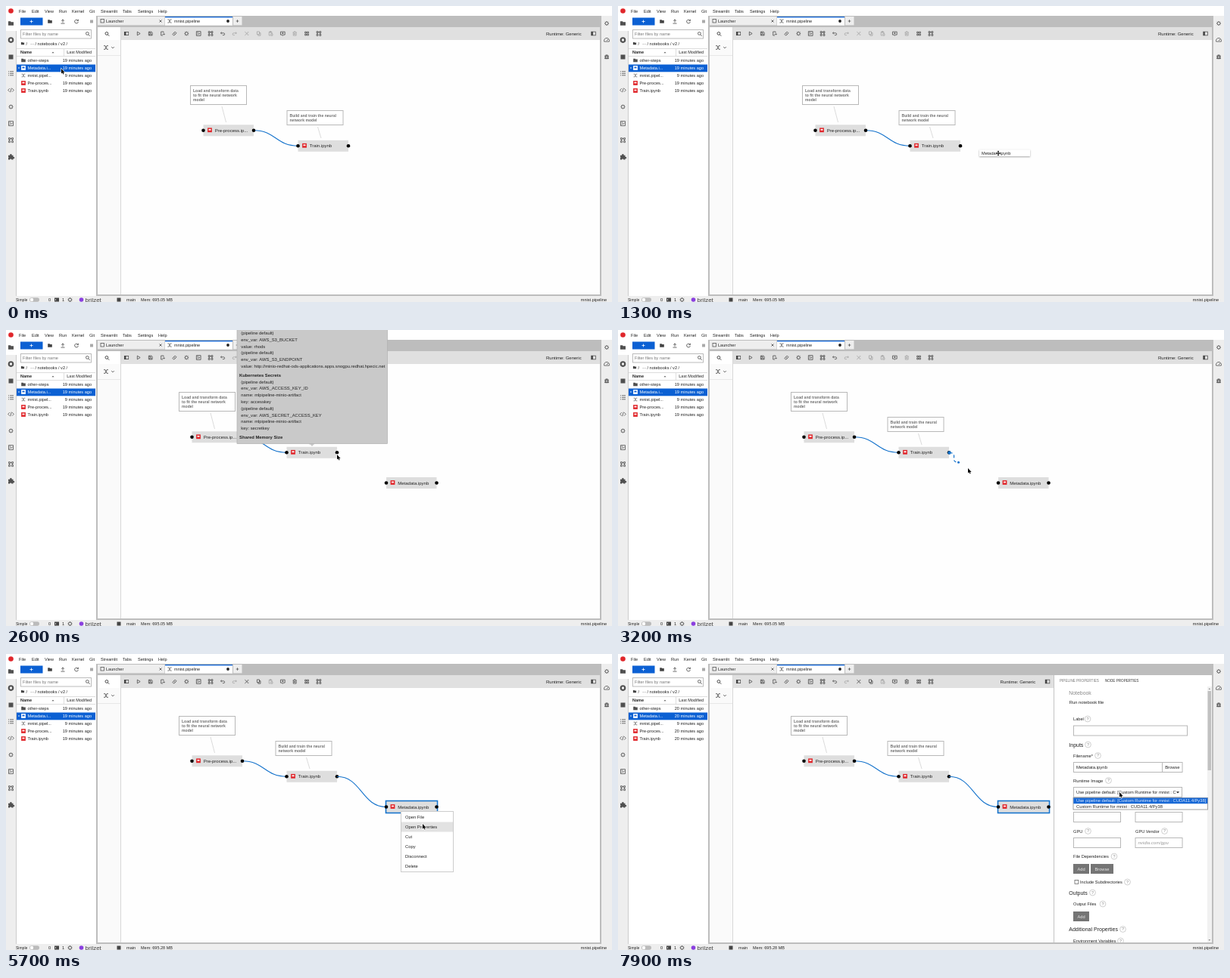
Animation, 800 px wide and 392 px high, one loop 8000 ms. Source, as an HTML page with a canvas:

```html
<!DOCTYPE html>
<html lang="en">
<head>
<meta charset="utf-8">
<title>Pipeline editor</title>
<style>
html, body { margin: 0; width: 100%; height: 100%; overflow: hidden; background: #fff; }
canvas { display: block; width: 800px; height: 392px; }
</style>
</head>
<body>
<canvas id="stage" width="800" height="392"></canvas>
<script>
const ctx = document.getElementById('stage').getContext('2d');
const LOOP = 8000, STEP = 100;
const SANS = '"Liberation Sans", Arial, sans-serif';
const BLUE = '#0b60d3', LINK = '#1573cc', INK = '#222', RED = '#e0262b', FRAME = '#bdbdbd';

// ---------- drawing helpers ----------
function box(x, y, w, h, fill, stroke, lineWidth = 1) {
  if (fill) { ctx.fillStyle = fill; ctx.fillRect(x, y, w, h); }
  if (stroke) { ctx.strokeStyle = stroke; ctx.lineWidth = lineWidth; ctx.strokeRect(x, y, w, h); }
}

// y is the vertical middle of the capitals
function text(str, x, y, size = 5.6, color = INK, style = '', align = 'left') {
  ctx.font = `${style} ${size}px ${SANS}`;
  ctx.fillStyle = color;
  ctx.textAlign = align;
  ctx.fillText(str, x, y + size * 0.36);
}

function dot(x, y, r, color) {
  ctx.fillStyle = color;
  ctx.beginPath();
  ctx.arc(x, y, r, 0, 7);
  ctx.fill();
}

function line(x1, y1, x2, y2, color, width = 1) {
  ctx.strokeStyle = color;
  ctx.lineWidth = width;
  ctx.beginPath();
  ctx.moveTo(x1, y1);
  ctx.lineTo(x2, y2);
  ctx.stroke();
}

function icon(name, x, y, color = '#444', scale = 1) {
  const path = new Path2D(ICONS[name]);
  ctx.save();
  ctx.translate(x, y);
  ctx.scale(scale, scale);
  ctx.fillStyle = ctx.strokeStyle = color;
  ctx.lineWidth = 0.8;
  if (SOLID.has(name)) ctx.fill(path, 'evenodd'); else ctx.stroke(path);
  ctx.restore();
}

const GRID = 'M-2.5-2.5H-.6V-.6H-2.5ZM.6-2.5H2.5V-.6H.6ZM-2.5 .6H-.6V2.5H-2.5ZM.6 .6H2.5V2.5H.6Z';
const GEAR = 'M-2 0A2 2 0 1 0 2 0A2 2 0 1 0-2 0M0-3V-2M0 2V3M-3 0H-2M2 0H3M-2.2-2.2L-1.4-1.4M1.4 1.4L2.2 2.2M-2.2 2.2L-1.4 1.4M1.4-1.4L2.2-2.2';
const ICONS = {
  folder: 'M-3.5-2.7H-.5L.3-1.8H3.5V2.8H-3.5Z',
  running: 'M-3.8 0A3.8 3.8 0 1 0 3.8 0A3.8 3.8 0 1 0-3.8 0M-1.5-1.5V1.5H1.5V-1.5Z',
  list: 'M-3.5-2.5H-2.5M-1.5-2.5H3.5M-3.5 0H-2.5M-1.5 0H3.5M-3.5 2.5H-2.5M-1.5 2.5H3.5',
  code: 'M-1.7-2.2L-3.8 0L-1.7 2.2M1.7-2.2L3.8 0L1.7 2.2M.7-2.8L-.7 2.8',
  gear: GEAR,
  image: 'M-3-3H3V3H-3ZM-2 1.8L-.5 0L.5 1L2-1M-2-1.5H0',
  nodes: 'M-3-3H-1V-1H-3ZM1-3H3V-1H1ZM-3 1H-1V3H-3ZM1 1H3V3H1ZM-1-2H1M-2-1V1M2-1V1',
  puzzle: 'M-3.5-2H-1.3A1.3 1.3 0 1 1 1.1-2H3V.2A1.2 1.2 0 1 1 3 2.3V3.7H.8A1.1 1.1 0 0 0-1.4 3.7H-3.5V1.5A1.1 1.1 0 0 0-3.5-.2Z',
  gauge: 'M-3.3 2A3.5 3.5 0 1 1 3.3 2ZM0 1L2-1.3',
  bug: 'M-1.6-1.5H1.6V2.5H-1.6ZM-3-1H3M-3 .8H3M-3 2.4H3M-1-3L0-1.6L1-3',
  search: 'M-2.5-.6A1.9 1.9 0 1 0 1.3-.6A1.9 1.9 0 1 0-2.5-.6M.8 .8L2.8 2.8',
  panel: 'M-3.2-2.7H3.2V2.7H-3.2ZM-.6-1.9V1.9H2.5V-1.9Z',
  play: 'M-1.6-2.5L2.4 0L-1.6 2.5Z',
  save: 'M-2.5-2.5H1.5L2.5-1.5V2.5H-2.5ZM-1.2 2.5V.5H1.2V2.5M-1.2-2.5V-1H1',
  export: 'M1.5-1V-2.6H-2V2.6H.5M0 .9H3L2 0M3 .9L2 1.8',
  eraser: 'M-2.7 .9L.8-2.6L2.7-.7L-.6 2.6H-1.2ZM-1-.8L1 1.1',
  undo: 'M-1.2-2L-2.6-.7L-1.2 .6M-2.6-.7H1.4Q2.8-.7 2.8 .8T1.4 2.2H0',
  redo: 'M1.2-2L2.6-.7L1.2 .6M2.6-.7H-1.4Q-2.8-.7-2.8 .8T-1.4 2.2H0',
  cut: 'M-2.5-2.5L1.6 1.2M-2.5 2.5L1.6-1.2M1.2 1.8H2.8M1.2-1.8H2.8',
  copy: 'M-2.3-2.7H1V1.2H-2.3ZM1-1H2.5V2.8H-.8V1.2',
  paste: 'M-2.3-2.2H1.6V0M-2.3-2.2V2.6H-.3M-1.2-2.9H.6V-1.6H-1.2ZM.4 .2H2.6V2.8H.4Z',
  comment: 'M-3-2.5H3V1.7H1L0 3L-1 1.7H-3ZM0-1.6V.9M-1.2-.4H1.2',
  trash: 'M-2.6-1.8H2.6M-1-2.8H1M-2-1.8V2.7H2V-1.8M-.6-.5V1.5M.6-.5V1.5',
  grid: GRID,
  flow: 'M-3-2.3H-1M1-2.3H3M-1-2.3L1 2.3M-1 2.3L1-2.3M-3 2.3H-1M1 2.3H3',
  plus: 'M-2 0H2M0-2V2',
  close: 'M-1.5-1.5L1.5 1.5M1.5-1.5L-1.5 1.5',
  down: 'M-1.8-.9L0 .9L1.8-.9',
  upload: 'M-2.5 2.6H2.5M0 1.3V-2.6M-1.7-.8L0-2.6L1.7-.8',
  refresh: 'M2.1-1.2A2.4 2.4 0 1 0 2.4 .6M2.4-2.8V-.9H.5',
  terminal: 'M-3-2.6H3V2.6H-3ZM-2-1.2L-.7 0L-2 1.2Z',
  caretUp: 'M-1.8 1L0-1L1.8 1Z',
  caretDown: 'M-2-1.1H2L0 1.2Z',
  arrow: 'M0 0V6.6L1.5 5.3L2.5 7.6L3.6 7.1L2.6 4.9H4.6Z',
  move: 'M0-3.5L1.3-2H.5V-.5H2V-1.3L3.5 0L2 1.3V.5H.5V2H1.3L0 3.5L-1.3 2H-.5V.5H-2V1.3L-3.5 0L-2-1.3V-.5H-.5V-2H-1.3Z'
};
const SOLID = new Set(['folder', 'running', 'puzzle', 'panel', 'terminal', 'caretUp', 'caretDown', 'arrow', 'move']);

// ---------- timing ----------
// [time, x, y] of the pointer
const POINTER = [
  [0, 73, 83], [100, 76, 84], [900, 533, 206], [1300, 502, 195], [1600, 502, 195], [1800, 500, 214],
  [2400, 437, 165], [2900, 437, 165], [3200, 462, 183], [3800, 504, 203], [4200, 504, 203],
  [4800, 521, 205], [5100, 521, 207], [5700, 550, 225], [6100, 550, 226], [6600, 575, 240],
  [6800, 575, 240], [7600, 662, 183], [8000, 662, 183]
];

function pointerAt(t) {
  const i = POINTER.findIndex(k => k[0] > t);
  const [t0, x0, y0] = POINTER[i - 1], [t1, x1, y1] = POINTER[i];
  const p = (t - t0) / (t1 - t0), e = p * p * (3 - 2 * p);
  return [x0 + (x1 - x0) * e, y0 + (y1 - y0) * e];
}

const within = (t, from, to) => t >= from && t < to;

// ---------- shell ----------
function drawMenuBar() {
  box(0, 0, 800, 13, '#fff');
  dot(6.5, 6.5, 3.3, RED);
  const items = { File: 17, Edit: 34, View: 51, Run: 70, Kernel: 87, Git: 110, Streamlit: 125, Tabs: 154, Settings: 174, Help: 201 };
  for (const name in items) text(name, items[name], 6.5);
}

function drawSidebars() {
  box(0, 13, 13, 371, '#eee');
  box(0, 13, 14, 20, '#fff');
  line(13.5, 33, 13.5, 384, '#ccc');
  ['folder', 'running', '', 'list', 'code', 'gear', 'image', 'nodes', 'puzzle']
    .forEach((name, i) => name && icon(name, 6.5, 23 + i * 22.1, '#505050'));
  box(3.5, 64.5, 6, 6, '#505050');
  box(786, 13, 14, 371, '#eee');
  ['gear', 'gauge', 'bug'].forEach((name, i) => icon(name, 793, 23 + i * 22.1, '#505050'));
}

function notebookIcon(x, y, color = RED, inner = '#fff') {
  box(x - 2.9, y - 2.9, 5.8, 5.8, color);
  box(x - 1.5, y - 1.4, 3, 1.8, inner);
}

function drawFiles(minutes) {
  box(14, 13, 105, 371, '#fff');
  box(19, 15.5, 29.5, 10, BLUE);
  icon('plus', 33.5, 20.5, '#fff');
  icon('folder', 58, 20.5, '#444', 0.8);
  icon('upload', 75, 20.5);
  icon('refresh', 93, 20.5);
  box(111, 18.5, 4, 4, '#aaa');
  box(19.5, 31.5, 93, 11.5, '#fff', '#bbb');
  text('Filter files by name', 22, 37.3, 5.6, '#777');
  icon('search', 108, 37);
  icon('folder', 22, 49.5, '#444', 0.6);
  text('/', 26.5, 49.5);
  text('···', 32, 49.5);
  text('/ notebooks / v2 /', 38.5, 49.5);

  line(14, 56.5, 118, 56.5, '#ddd');
  line(14, 66.5, 118, 66.5, '#ddd');
  line(76.5, 57, 76.5, 66, '#ddd');
  text('Name', 19, 61.5, 5.5, INK, 'bold');
  icon('caretUp', 62, 61.5, '#444', 0.8);
  text('Last Modified', 113, 61.5, 5.5, INK, '', 'right');

  const names = ['other-steps', 'Metadata.i...', 'mnist.pipel...', 'Pre-proces...', 'Train.ipynb'];
  names.forEach((name, i) => {
    const y = 72 + i * 10, selected = i === 1, ink = selected ? '#fff' : INK;
    if (selected) {
      box(14, 77.5, 104, 9.8, BLUE);
      dot(17, y, 0.8, '#fff');
    }
    if (i === 0) icon('folder', 23, y, '#505050', 0.8);
    else if (i === 2) icon('flow', 23, y, '#555', 0.8);
    else notebookIcon(23, y, selected ? '#fff' : RED, selected ? BLUE : '#fff');
    text(name, 28.5, y, 5.6, ink);
    text(`${i === 2 ? 9 : minutes} minutes ago`, 113, y, 5.6, ink, '', 'right');
  });
}

function drawStatus(memory) {
  box(0, 384, 800, 8, '#eee');
  text('Simple', 13, 389, 5);
  ctx.fillStyle = '#bbb';
  ctx.beginPath();
  ctx.roundRect(31, 386.3, 13, 5.4, 2.7);
  ctx.fill();
  dot(34, 389, 2.2, '#fff');
  text('0', 56, 389);
  icon('terminal', 67, 389);
  text('1', 74, 389);
  icon('gear', 84.5, 389);
  dot(99.5, 389, 2.8, '#8a3fe0');
  text('brilzet', 104.5, 388.8, 8, '#444');
  box(146.5, 386.5, 5, 5, '#444');
  text('main', 159, 389);
  text(`Mem: ${memory} MB`, 178, 389, 5.5);
  text('mnist.pipeline', 793, 389, 5.6, INK, '', 'right');
}

function drawTabs() {
  box(119, 13, 667, 13, FRAME);
  box(121, 14, 88.5, 11.5, '#eee');
  box(210, 14, 89, 12, '#fff');
  box(210, 14, 89, 1.3, BLUE);
  box(300, 14, 11.5, 11.5, '#eee');
  box(125, 17.5, 4.5, 4.5, null, '#555', 0.8);
  text('Launcher', 132, 20);
  icon('close', 204, 20);
  icon('flow', 216, 20, '#555', 0.9);
  text('mnist.pipeline', 222, 20);
  dot(293, 20, 1.9, INK);
  icon('plus', 305.5, 20, '#444', 0.9);
}

function drawToolbar(right, selected) {
  box(121, 28, right - 121, 17, '#e0e0e0');
  box(121, 28, 30, 17, '#fff');
  icon('search', 133.5, 37, '#222');
  box(121, 45, 30, 337, '#fafafa');
  icon('flow', 132, 55);
  icon('down', 141, 55);
  line(121, 65.5, 151, 65.5, '#e8e8e8');
  line(151.5, 28, 151.5, 382, '#d8d8d8');
  const names = ['panel', 'play', 'save', 'export', 'eraser', 'gear', 'image', 'nodes', 'undo', 'redo',
    'cut', 'copy', 'paste', 'comment', 'trash', 'grid', 'nodes'];
  const faint = new Set(selected ? ['redo', 'paste'] : ['redo', 'cut', 'copy', 'paste', 'trash']);
  names.forEach((name, i) => icon(name, 159 + i * 15.87, 36.5, faint.has(name) ? '#a0a0a0' : '#444', 0.95));
  text('Runtime: Generic', right - 24.3, 36.8, 6, INK, '', 'right');
  icon('panel', right - 8.5, 36.5);
}

function drawFrame() {
  box(119, 13, 2, 371, FRAME);
  box(121, 25.7, 663, 2.3, FRAME);
  box(784, 26, 2, 358, FRAME);
  box(119, 382, 667, 2, FRAME);
}

// ---------- pipeline canvas ----------
function node(x, y, label, selected) {
  box(x, y - 7.5, 66.5, 15, '#dedede');
  if (selected) box(x - 0.5, y - 8, 68, 16, null, LINK, 1.6);
  dot(x, y, 2.3, '#000');
  dot(x + 66.5, y, 2.3, '#000');
  notebookIcon(x + 8.5, y - 0.5);
  text(label, x + 15.2, y, 6);
}

function note(x, y, w, h, lines) {
  box(x + 0.5, y + 0.5, w, h, '#fff', '#b8b8b8');
  lines.forEach((str, i) => text(str, x + 4, y + 6.8 + i * 6, 5.1, '#707070', 'bold'));
}

function wire(x1, y1, x2, y2) {
  const mid = (x1 + x2) / 2;
  ctx.strokeStyle = LINK;
  ctx.lineWidth = 1.1;
  ctx.beginPath();
  ctx.moveTo(x1, y1);
  ctx.bezierCurveTo(mid, y1, mid, y2, x2, y2);
  ctx.stroke();
}

function pendingWire(x, y) {
  const reach = Math.max(13, (x - 437.5) / 2);
  ctx.strokeStyle = LINK;
  ctx.lineWidth = 1.2;
  ctx.setLineDash([4, 3]);
  ctx.beginPath();
  ctx.moveTo(437.5, 162.5);
  ctx.bezierCurveTo(437.5 + reach, 162.5, x - reach, y, x, y);
  ctx.stroke();
  ctx.setLineDash([]);
  dot(437.5, 162.5, 2.2, LINK);
  dot(x, y, 1.5, LINK);
}

function drawPipeline(t, selected) {
  const dropped = t >= 1600;
  ctx.save();
  if (dropped) ctx.translate(-15, -23);
  line(285, 133, 290.5, 154, '#ccc', 0.7);
  line(411.5, 160, 416, 175, '#ccc', 0.7);
  note(243, 105, 74, 25, ['Load and transform data', 'to fit the neural network', 'model']);
  note(370.5, 138, 74, 19, ['Build and train the neural', 'network model']);
  wire(327, 164.8, 385.5, 185.3);
  node(260.5, 164.8, 'Pre-process.ip...');
  node(385.5, 185.3, 'Train.ipynb');
  ctx.restore();
  if (!dropped) return;
  if (t >= 4000) wire(437, 162.3, 502, 202.5);
  node(502, 202.5, 'Metadata.ipynb', selected);
  if (within(t, 3100, 4000)) {
    const [x, y] = pointerAt(t - 100);
    const lag = t <= 3200 ? 1 : Math.max(0, 1 - (t - 3200) / 500);
    pendingWire(x - 6 * lag, y - 3 * lag);
  }
}

function drawTooltip() {
  ctx.fillStyle = '#c9c9c9';
  ctx.beginPath();
  ctx.moveTo(400, 150);
  ctx.lineTo(404, 154);
  ctx.lineTo(408, 150);
  ctx.fill();
  box(305, -2, 198.5, 152.5, '#c9c9c9', '#b0b0b0', 0.7);
  const groups = [
    [4, ['(pipeline default)', 'env_var: AWS_S3_BUCKET', 'value: rhods', '(pipeline default)', 'env_var: AWS_S3_ENDPOINT',
      'value: http://minio-redhat-ods-applications.apps.snogpu.redhat.hpecic.net']],
    [68.5, ['(pipeline default)', 'env_var: AWS_ACCESS_KEY_ID', 'name: mlpipeline-minio-artifact', 'key: accesskey',
      '(pipeline default)', 'env_var: AWS_SECRET_ACCESS_KEY', 'name: mlpipeline-minio-artifact', 'key: secretkey']]
  ];
  for (const [top, rows] of groups) rows.forEach((str, i) => text(str, 310.3, top + i * 8.78, 5.85));
  text('Kubernetes Secrets', 308, 59.5, 5.85, INK, 'bold');
  text('Shared Memory Size', 308, 141.5, 5.85, INK, 'bold');
}

function drawContextMenu(pointerY) {
  box(521.5, 208.5, 69, 80, '#fff', '#ccc');
  ['Open File', 'Open Properties', 'Cut', 'Copy', 'Disconnect', 'Delete'].forEach((label, i) => {
    const y = 209.5 + i * 13;
    if (pointerY > y && pointerY < y + 13) box(522, y, 68, 13, '#e2e2e2');
    text(label, 527, y + 6.5, 5.8);
  });
}

// ---------- properties panel ----------
function heading(str, x, y, helpX, size = 5.65) {
  text(str, x, y, size);
  ctx.strokeStyle = '#bbb';
  ctx.lineWidth = 0.7;
  ctx.beginPath();
  ctx.arc(helpX, y, 3.9, 0, 7);
  ctx.stroke();
  text('?', helpX, y, 5.5, '#888', '', 'center');
}

function field(x, y, w, value = '', color = INK, style = '') {
  box(x + 0.5, y + 0.5, w - 1, 13, '#fff', '#b8b8b8');
  text(value, x + 4, y + 7, 6, color, style);
}

function button(label, x, y, w) {
  box(x, y, w, 13, '#757575');
  text(label, x + w / 2, y + 6.5, 5.7, '#e8e8e8', '', 'center');
}

function drawProperties() {
  ctx.save();
  ctx.beginPath();
  ctx.rect(575, 27.5, 209, 354.5);
  ctx.clip();
  box(575, 27, 209, 356, '#fff');
  line(575.5, 27, 575.5, 382, '#c4c4c4');
  text('PIPELINE PROPERTIES', 583, 35.5, 4.63, '#777');
  text('NODE PROPERTIES', 643, 35.5, 4.63, '#333');
  box(778, 43, 6, 339, '#f1f1f1');
  box(778.5, 49, 4.5, 105, '#c1c1c1');
  icon('caretUp', 780.8, 46, '#777', 0.7);
  icon('caretDown', 780.8, 379, '#777', 0.7);

  text('Notebook', 595.3, 52, 6.9, '#888');
  text('Run notebook file', 595.7, 64, 5.85);
  heading('Label', 601, 86, 620);
  field(601, 94.5, 151);
  heading('Inputs', 595.3, 120, 620.5, 7);
  heading('Filename*', 601, 134.5, 633.5, 5.8);
  field(601, 143, 118, 'Metadata.ipynb');
  box(718.5, 143.5, 26.5, 13, '#fff', '#b8b8b8');
  text('Browse', 731.8, 150, 5.8, INK, '', 'center');
  heading('Runtime Image', 601, 167.5, 647.5, 5.8);
  field(601, 176, 144);
  ctx.save();
  ctx.beginPath();
  ctx.rect(601, 176, 136, 14);
  ctx.clip();
  text('Use pipeline default: [Custom Runtime for mnist : CUDA11.4/Py38]', 605, 183, 5.8);
  ctx.restore();
  icon('caretDown', 739, 183.3, '#222');
  heading('CPU', 601, 200.5, 620.5);
  heading('RAM(GB)', 683, 200.5, 714);
  field(601, 209, 63);
  field(682.5, 209, 63);
  heading('GPU', 601, 234.5, 620.5);
  heading('GPU Vendor', 683, 234.5, 721.5);
  field(601, 243, 63);
  field(682.5, 243, 63, 'nvidia.com/gpu', '#999', 'italic');
  heading('File Dependencies', 601, 268, 655);
  button('Add', 601, 278, 21);
  button('Browse', 624, 278, 30);
  box(603, 299.5, 4.8, 4.8, '#fff', '#666', 0.8);
  heading('Include Subdirectories', 610, 302, 672.5);
  heading('Outputs', 595.3, 316, 626.5, 7);
  heading('Output Files', 601, 331, 640);
  button('Add', 601, 341, 21);
  heading('Additional Properties', 595.3, 364.5, 666.5, 7);
  heading('Environment Variables', 601, 380, 663.5);
  ctx.restore();
}

function drawOptions() {
  box(601, 190.3, 177.5, 15.7, '#fff', '#777', 0.7);
  box(601.3, 190.6, 177, 7.6, '#1768d6');
  text('Use pipeline default: [Custom Runtime for mnist : CUDA11.4/Py38]', 605, 194.3, 5.8, '#dce9fb');
  text('Custom Runtime for mnist : CUDA11.4/Py38', 605, 201.8, 5.8);
}

// ---------- pointer ----------
function drawPointer(t) {
  const [x, y] = pointerAt(t);
  const dragging = within(t, 100, 1600);
  if (dragging) {
    ctx.save();
    ctx.shadowColor = 'rgba(0,0,0,.35)';
    ctx.shadowBlur = 2;
    ctx.shadowOffsetY = 0.8;
    box(x - 25, y - 4.8, 67, 8.8, '#fff');
    ctx.restore();
    text('Metadata.ipynb', x - 22, y - 0.3);
  }
  const shape = dragging ? 'move' : 'arrow';
  ctx.save();
  ctx.translate(x, y);
  ctx.strokeStyle = '#fff';
  ctx.lineWidth = 1.2;
  ctx.stroke(new Path2D(ICONS[shape]));
  ctx.restore();
  icon(shape, x, y, '#000');
}

function render(t) {
  const panelOpen = t >= 6200, selected = t >= 5000;
  ctx.clearRect(0, 0, 800, 392);
  drawMenuBar();
  drawSidebars();
  drawFiles(t >= 7300 ? 20 : 19);
  drawTabs();
  box(121, 27, 663, 355, '#fefefe');
  drawToolbar(panelOpen ? 575.5 : 784, selected);
  drawPipeline(t, selected);
  if (panelOpen) drawProperties();
  drawFrame();
  drawStatus(t >= 3700 ? '695.28' : '695.05');
  if (within(t, 2400, 2900)) drawTooltip();
  if (within(t, 5000, 6100)) drawContextMenu(pointerAt(t)[1]);
  if (t >= 7800) drawOptions();
  drawPointer(t);
}

const start = performance.now();
function tick() {
  const t = (performance.now() - start) % LOOP;
  render(Math.floor(t / STEP) * STEP);
  requestAnimationFrame(tick);
}
tick();
</script>
</body>
</html>
```
